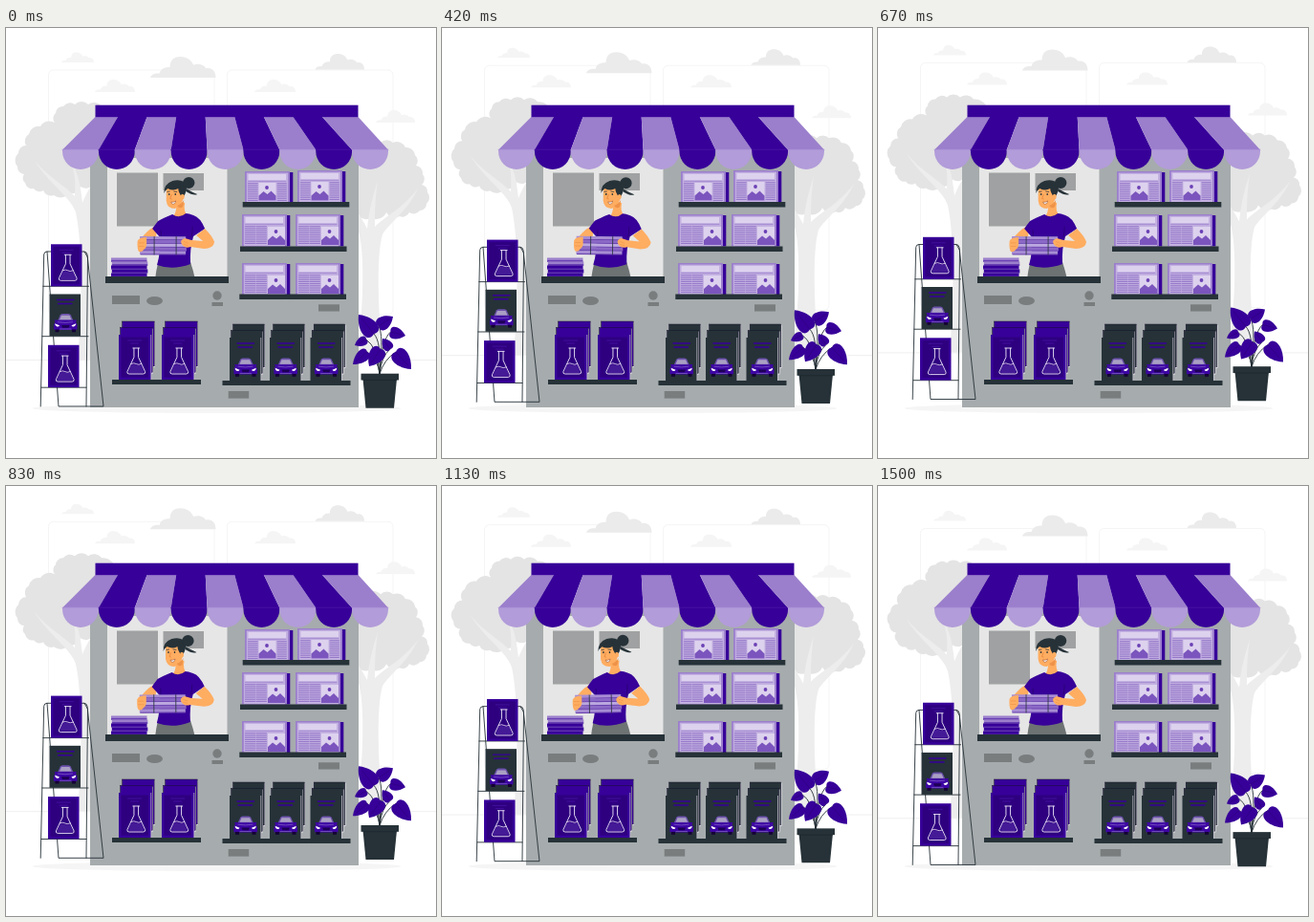
An HTML page for the animation above (1540 ms loop, 450 by 450 pixels).

```html
<!DOCTYPE html>
<html lang="en">
<head>
<meta charset="utf-8">
<title>News stand</title>
<style>
html, body { margin: 0; width: 100%; height: 100%; overflow: hidden; background: #fff; }
svg { display: block; width: 100vw; height: 100vh; }
</style>
</head>
<body>
<svg id="stage" viewBox="0 0 450 450" xmlns="http://www.w3.org/2000/svg"></svg>
<script>
const LOOP = 1540, LEAD = 55, RISE = 8.6;
const PURPLE = '#370099', DEEP = '#26006b', PANEL = '#2e0080';
const MID = '#9b7fcc', PALE = '#b29cd9', MIST = '#ddd2ee';
const DARK = '#263238', WALL = '#a6abad', TRIM = '#797d7e', SKIN = '#ffad61';

const rect = (x, y, w, h, fill, extra = '') =>
  `<rect x="${x}" y="${y}" width="${w}" height="${h}" fill="${fill}" ${extra}/>`;
const path = (d, fill, extra = '') => `<path d="${d}" fill="${fill}" ${extra}/>`;
const line = (d, color, width = 1) =>
  path(d, 'none', `stroke="${color}" stroke-width="${width}" stroke-linecap="round" stroke-linejoin="round"`);
const oval = (x, y, rx, ry, fill) => `<ellipse cx="${x}" cy="${y}" rx="${rx}" ry="${ry}" fill="${fill}"/>`;
const group = (body, move = '', id = '') => `<g ${id && `id="${id}"`} ${move && `transform="${move}"`}>${body}</g>`;

// Closed outline of small outward arcs through the points
function scallop(pts, fill) {
  let d = `M${pts[0]}`;
  pts.forEach((p, i) => {
    const q = pts[(i + 1) % pts.length];
    const r = Math.hypot(q[0] - p[0], q[1] - p[1]) * 0.7;
    d += `A${r} ${r} 0 0 1 ${q}`;
  });
  return path(d + 'Z', fill);
}

function cloud(x, y, w, h, fill) {
  const d = 'M0 1C.02 .82 .08 .78 .14 .8C.16 .56 .22 .5 .3 .5C.3 .12 .38 0 .46 0' +
    'C.56 0 .63 .16 .66 .4C.72 .3 .82 .38 .85 .56C.93 .5 1 .66 1 1Z';
  return path(d, fill, `transform="translate(${x} ${y}) scale(${w} ${h})"`);
}

function backdrop() {
  const frame = x => rect(x, 44, 173.5, 256, 'none', 'rx="5" stroke="#f5f5f5"');
  const leftCrown = [[51, 99], [52, 89], [60, 82], [72, 80], [86, 80], [100, 82], [115, 95], [118, 130],
    [104, 150], [92, 163], [78, 166], [66, 173], [50, 175], [39, 170], [29, 168], [20, 162], [19, 153],
    [12, 145], [13, 131], [21, 123], [24, 111], [36, 103]];
  const rightCrown = [[352, 130], [375, 120], [392, 120], [405, 120], [418, 125], [428, 133], [429, 144],
    [436, 153], [435, 164], [441, 172], [440, 184], [433, 191], [422, 193], [412, 197], [398, 193],
    [382, 199], [366, 193], [350, 170]];
  const bark = '#ededed';
  return frame(44.5) + frame(231.5) + rect(0, 347, 450, 0.8, '#ebebeb') +
    cloud(58, 25.5, 34, 10.5, '#f5f5f5') + cloud(93, 54, 42, 13, '#f5f5f5') +
    cloud(151, 30, 68.5, 22, '#ebebeb') + cloud(260, 54, 43, 13, '#f5f5f5') +
    cloud(323.5, 27, 51.5, 16.5, '#ebebeb') + cloud(387, 86, 41, 13, '#f5f5f5') +
    scallop(leftCrown, '#e4e4e4') + scallop(rightCrown, '#e4e4e4') +
    path('M75 347C80 290 80 225 73 193C68 177 45 163 30 139C44 156 62 165 72 176C73 160 72 150 67 138' +
      'C76 152 78 165 80 183C85 170 92 160 100 152V347Z', bark) +
    path('M366 347C374 300 375 250 371 222C368 205 362 190 352 176C364 186 372 198 378 210' +
      'C380 190 384 175 389 160C386 180 386 195 386 208C398 196 414 190 431 168C420 192 402 203 394 216' +
      'C387 240 390 300 394 347Z', bark);
}

function awning() {
  const step = 341 / 9, topStep = 275 / 9;
  const top = i => i === 0 ? 93.5 : i === 9 ? 368.5 : 86.5 + i * topStep;
  let s = '';
  for (let i = 0; i < 9; i++) {
    const a = 59 + i * step, b = a + step, dark = i % 2;
    s += path(`M${top(i)} 93H${top(i + 1)}L${b} 127.5H${a}Z`, dark ? PURPLE : MID) +
      path(`M${a} 127V129A${step / 2} 19 0 0 0 ${b} 129V127Z`, dark ? PURPLE : PALE) +
      line(`M${a} 127.3H${b}`, dark ? '#4d1ba5' : '#a68cd2', 0.6);
  }
  return s + rect(93.5, 80.7, 275, 12.5, PURPLE);
}

function paper(x, y, h, centred) {
  const px = centred ? 14.5 : 27, py = centred ? 12 : 13, ph = h - py - 1.5;
  let s = rect(x + 3, y + 1, 47.3, h - 1, PURPLE) + rect(x, y, 47, h, MID) +
    rect(x + 1.8, y + 1.6, 43.2, h - 1.6, '#c3b1e1') + rect(x + 3.5, y + 3, 39.5, 6, MIST) +
    line(`M${x + 3.5} ${y + 10.6}H${x + 43}`, MID, 0.7);
  const cols = centred ? [[3.3, 10], [34, 9.5]] : [[3.3, 10.5], [15, 10.5]];
  for (const [cx, w] of cols)
    for (let ly = 12.8; ly < h - 1; ly += 2.2)
      s += line(`M${x + cx} ${y + ly}h${w}`, '#8563c1', 0.8);
  const X = x + px, Y = y + py;
  return s + rect(X, Y, 18, ph, MIST) + oval(X + 8.5, Y + 5, 1.9, 1.9, '#6b40b5') +
    path(`M${X} ${Y + ph}V${Y + ph - 5}L${X + 5} ${Y + ph - 9.5}L${X + 9} ${Y + ph - 6.5}` +
      `L${X + 13} ${Y + ph - 10}L${X + 18} ${Y + ph - 5}V${Y + ph}Z`, '#7b55bd');
}

function car(x, y) {
  return group(
    path('M4.5 7L7.3 1.6Q8 .5 9.5 .4H16Q17.5 .5 18.2 1.6L21 7Z', '#6d52ad') +
    path('M6.6 6L8.5 2H17L19 6Z', '#aaa0c4') +
    path('M1 6.3H3.5L5.5 6.5H20L22 6.3H24.5L23.5 8Q25 9.5 25 12V14.5Q24.8 15.5 23.5 15.5H2' +
      'Q.5 15.5 .4 14.5V12Q.5 9.5 2 8Z', '#3d06a3') +
    path('M2 15H6V17.5H2ZM19.5 15H23.5V17.5H19.5Z', '#150035') +
    path('M1.6 9.5L6.5 11.2Q6 12.7 3.8 12.4Q1.8 12 1.6 9.5ZM23.8 9.5L19 11.2Q19.5 12.7 21.6 12.4Q23.6 12 23.8 9.5Z', '#fff') +
    path('M8.5 11H17L16 13.6H9.5Z', '#1d0055') + line('M5 8.2Q12.5 9.4 20 8.2M7 14.6H18.5', '#8d6fcb', 0.6),
    `translate(${x} ${y}) scale(1 1.13)`);
}

const flask = (x, y) => group(
  line('M-3.4 0H3.4M-2.3 .2V9.5L-9.3 24.5Q-10 26.8 -7.5 27H7.5Q10 26.8 9.3 24.5L2.3 9.5V.2', '#efe9fa', 0.9) +
  line('M-5.5 16.5Q-2 15 0 16.5T5.5 16.5', '#efe9fa', 0.8) +
  path('M-5.7 17.5Q-2 16.5 0 17.5T5.7 17.5L8.2 24Q8.5 25.8 7 26H-7Q-8.5 25.8 -8.2 24Z', '#6a42b8', 'opacity=".4"'),
  `translate(${x} ${y})`);

function lab(x, y, w, h) {
  return rect(x, y, w, h, PURPLE) + rect(x + 2.5, y + 2.5, w - 5, h - 5, PANEL) +
    line(`M${x + w / 2 - 7} ${y + 6}h14M${x + w / 2 - 4} ${y + 9}h8`, '#4713a3', 0.8) +
    flask(x + w / 2 + 1.5, y + h - 33);
}

function auto(x, y, w, h) {
  return rect(x, y, w, h, DARK) +
    line(`M${x + 8} ${y + 6}H${x + w - 7}M${x + 9} ${y + 10}H${x + w - 9}`, PURPLE, 1.4) +
    car(x + 4, y + h - 24);
}

function stack(draw, x, y, w, h, color) {
  const back = (dx, dy) => rect(x + dx + 0.8, y + dy + 1, w, h, '#e9e6ef') +
    rect(x + dx, y + dy, w, h, color, 'stroke="#15102b" stroke-width=".5"');
  return back(3.7, -14) + back(1.7, -7.5) + rect(x + 0.7, y, w, h, '#cfcad8') + draw(x, y, w, h);
}

function seller() {
  let bundle = '';
  ['#a78dd4', '#8b69c6', '#bba8df', '#8b69c6', '#a78dd4'].forEach((c, i) => {
    bundle += rect(140 + (i % 2) * 0.8, 218.2 + i * 3.8, 48, 3.8, c) +
      line(`M141 ${221.8 + i * 3.8}H187.5`, '#5a2fa6', 0.9);
  });
  bundle += line('M155 218.5V237M178 218.5V237', DARK, 0.8);
  return path('M159 246Q157 254 156 263H198Q196 254 193 245Z', '#6d7273') +
    path('M178 181L187 183Q185 191 190 197Q183 203 175 197Q179 192 178 181Z', SKIN) +
    path('M158 206L150 211Q142 218 139 224L142 233Q150 227 157 219Z', SKIN) +
    path('M174 195Q164 199 159 202Q155 207 153 210L161 219Q162 234 158 248Q174 254 193 247' +
      'Q192 231 196 218L208 210Q203 198 196 196Q191 194 188 194Q181 200 174 195Z', PURPLE) +
    line('M162 212Q162 218 163 222M195 208Q195 214 194 219', DEEP, 0.7) +
    bundle +
    path('M199 217L208 210Q216 218 218 224Q217 231 207 231L193 229Q187 231 184 226.5Q181 222 187 220L194 222L206 223Z', SKIN) +
    path('M147 219Q139 219 137.5 223Q137 232 139 234Q142 235 144 232Q147 230 147 227Z', SKIN) +
    line('M139 225H144M139 228.5H144M186 223.5L190 225M186 226.5L190 227.5', '#e58a3f', 0.5) +
    path('M167.500 166Q173 162 182 164Q187 169 186 177Q183 187 176.500 189Q168.500 189 167.500 181Z', SKIN) +
    path('M179 186Q184 184 186 180L185 187Q182 190 179 186Z', '#ee9349') +
    path('M165 173Q165 163 174 160Q181 158 186 161Q190 165 188 171Q187 176 184 177Q180 172 180 168Q175 171 169 168Q166 170 165 173Z', DARK) +
    oval(191, 162, 6.2, 6, DARK) + path('M188 168Q195 172 200 174Q196 176 188 171Z', DARK) +
    oval(184.5, 176.5, 2, 2.7, SKIN) +
    oval(170.5, 174, 0.8, 1.1, DARK) + oval(177, 174, 0.8, 1.1, DARK) +
    line('M168.5 171.5L171 171M175.5 171L178.5 171.5', DARK, 0.7) +
    line('M173 174.5L171.5 178.5L173 179', '#e07f35', 0.7) +
    path('M172.500 182Q175 183 177.500 181Q177 184.500 174.500 184.300Q173 184 172.500 182Z', '#fff', 'stroke="#8a3b1c" stroke-width=".5"');
}

function kiosk() {
  let s = rect(88, 127, 281, 270, WALL) + rect(106, 136, 125.5, 125, '#e6e6e6') +
    rect(116, 151.5, 43, 56, '#a0a1a2') + rect(164.5, 152, 42.5, 18, '#a0a1a2') +
    group(seller(), '', 'seller');
  for (let i = 0; i < 5; i++) {
    const y = 240.5 + i * 4, x = 110 + (i % 2) * 0.8, light = i < 2;
    s += rect(x, y, 37.5, 4, light ? MID : PURPLE) +
      line(`M${x + 0.5} ${y + 3.5}H${x + 37}`, light ? PURPLE : '#7d5bc0', light ? 1.1 : 0.5);
  }
  s += rect(104, 260, 129, 7, DARK) + rect(111, 280, 29, 9, TRIM) + oval(155.5, 285.5, 8.5, 4.5, TRIM) +
    oval(221, 280, 4.7, 4.7, TRIM) + rect(215.5, 287, 11.5, 4, TRIM) +
    rect(327, 289.3, 22, 7.2, TRIM) + rect(232.7, 380, 21.5, 7.6, TRIM);
  s += paper(250, 150, 32, true) + paper(305, 149, 33, true);
  for (const y of [195, 246]) s += paper(247, y, 33.5, false) + paper(303, y, 33.5, false);
  s += rect(247.7, 182, 111.6, 5.5, DARK) + rect(245, 228.5, 111.5, 5.5, DARK) + rect(244.3, 278.5, 111.7, 5.5, DARK);
  for (const x of [118, 163]) s += stack(lab, x, 321, 33.5, 47, PURPLE);
  for (const x of [234, 276, 318.5]) s += stack(auto, x, 324, 32.5, 45, DARK);
  return s + rect(111, 368, 93, 5, DARK) + rect(226.5, 369, 134, 5, DARK) + awning();
}

function rack() {
  return line('M43 234L55 396H102L85 237Q84.5 234 82 234', DARK, 0.9) +
    line('M36.2 396L39.7 237Q40 234 43 234H82L85.5 240L84 396M38.8 270.3H86.5M37.8 322.7H86M37 376.2H84', DARK, 0.9) +
    lab(47, 226.3, 32.5, 44) + auto(45.5, 278.5, 32.5, 44) + lab(44, 331.8, 32.5, 44.3);
}

function plant() {
  // Each leaf: base x, y, tip x, y, width ratio
  const leaves = [[385, 320, 369, 300, .68], [390, 312, 405, 302, .75], [402.5, 318, 418, 322, .75],
    [402, 336, 394, 325, .75], [377, 326, 365, 332, .68], [378, 339, 363, 352, .62],
    [392, 336, 380, 354, .72], [408, 339, 424, 357, .68]];
  let s = '';
  for (const [x, y] of leaves)
    s += line(`M391 362Q${(x + 391) / 2 + (x > 391 ? -4 : 5)} ${y + 8} ${x} ${y}`, DARK, 0.9);
  for (const [x, y, tx, ty, k] of leaves) {
    const n = Math.hypot(tx - x, ty - y), a = Math.atan2(ty - y, tx - x) * 180 / Math.PI;
    s += path(`M0 0C-.2 ${-k * .6} .45 ${-k * .8} 1 0C.45 ${k * .8} -.2 ${k * .6} 0 0Z`, PURPLE,
      `transform="translate(${x} ${y}) rotate(${a}) scale(${n})"`) +
      line(`M${x} ${y}L${x + (tx - x) * .75} ${y + (ty - y) * .75}`, DEEP, 0.4);
  }
  return s + path('M373.5 367H409L406 397.7H376.5Z', DARK) + rect(371.5, 361.7, 39.5, 6.8, DARK) +
    line('M374 368.5H408.5', '#18222a', 0.6);
}

const stage = document.getElementById('stage');
stage.innerHTML = group(backdrop(), '', 'back') + oval(220.5, 398, 193, 5, '#f5f5f5') +
  kiosk() + group(rack() + plant(), '', 'front');
const [back, front, clerk] = ['back', 'front', 'seller'].map(id => document.getElementById(id));

const phase = t => ((t + LEAD) % LOOP) / LOOP;
const lift = p => RISE * (1 - Math.abs(2 * p - 1));
const sway = p => p < .25 ? 4 * p : p < .75 ? 2 - 4 * p : 4 * p - 4;

function draw(t) {
  const p = phase(t);
  const move = `translate(0 ${lift(phase(0)) - lift(p)})`;
  back.setAttribute('transform', move);
  front.setAttribute('transform', move);
  clerk.setAttribute('transform', `rotate(${sway(p)} 178 270)`);
}

const start = performance.now();
function tick() {
  draw((performance.now() - start) % LOOP);
  requestAnimationFrame(tick);
}
draw(0);
requestAnimationFrame(tick);
</script>
</body>
</html>
```
